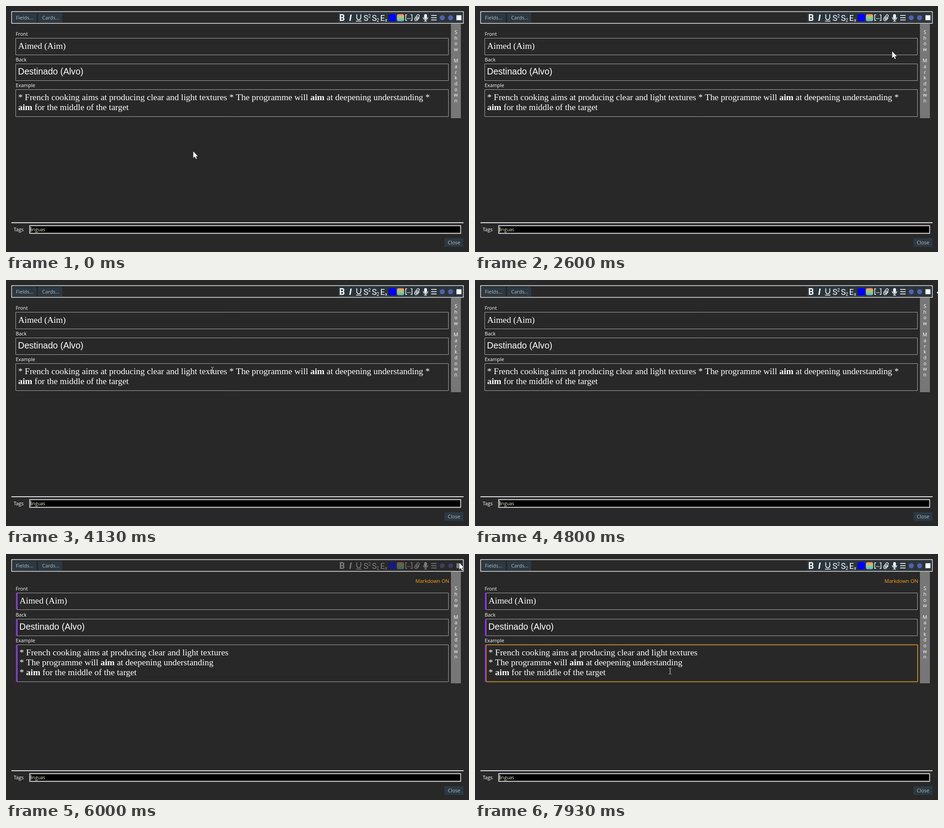
Recreate the animation shown at these times as an HTML page with a canvas. Size 1025x546 px, loop 8 s.

```html
<!DOCTYPE html>
<html lang="en">
<head>
<meta charset="utf-8">
<title>Card editor</title>
<style>
  html, body { margin: 0; width: 100%; height: 100%; overflow: hidden; background: #282828; }
  canvas { display: block; width: 1025px; height: 546px; }
</style>
</head>
<body>
<canvas id="stage" width="1025" height="546"></canvas>
<script>
const ctx = document.getElementById('stage').getContext('2d');
const LOOP = 8000, TICK = 1000 / 15;
const UI = '"Open Sans", "Noto Sans", sans-serif';
const SERIF = '"Liberation Serif", serif';
const SANS = '"Liberation Sans", sans-serif';
const ICON = 'Roboto, sans-serif';

const LAYOUTS = {
  plain: {
    left: 21.5, boxes: [[71.5, 37], [128.5, 37], [185.5, 60]],
    side: 210, letters: 62, caret: [272, 214],
    lines: ['* French cooking aims at producing clear and light textures * The programme will **aim** at deepening understanding *',
            '**aim** for the middle of the target']
  },
  markdown: {
    left: 24.5, boxes: [[86.5, 37], [144.5, 37], [201.5, 82]],
    side: 248, letters: 80.4, caret: [290, 252],
    lines: ['* French cooking aims at producing clear and light textures',
            '* The programme will **aim** at deepening understanding',
            '* **aim** for the middle of the target']
  }
};
const RIGHT = 979.5;

const smooth = p => p * p * (3 - 2 * p);
const easeOut = p => 1 - (1 - p) ** 2;

// Pointer path: tick, x, y, easing towards this point
const PATH = [
  [0, 414, 322], [6, 414, 322], [15, 717, 55], [25, 717, 55],
  [26, 707, 67], [28, 686, 88], [32, 878, 122], [37, 878, 122],
  [43, 1050, 37], [46, 1050, 36], [48, 992, 50], [49, 938, 71],
  [59, 411, 214, easeOut], [60, 411, 214], [72, 1033, 28], [73, 1050, 28],
  [75, 1050, 28], [76, 1017, 27], [77, 1010, 27], [80, 1010, 27],
  [81, 1006, 28], [89, 1006, 28], [90, 1003, 19], [97, 1003, 19],
  [105, 432, 260], [120, 432, 260]
];

function pointer(tick) {
  const i = Math.max(1, PATH.findIndex(k => k[0] >= tick));
  const [t0, x0, y0] = PATH[i - 1], [t1, x1, y1, ease = smooth] = PATH[i];
  const p = ease((tick - t0) / (t1 - t0));
  return [Math.round(x0 + (x1 - x0) * p), Math.round(y0 + (y1 - y0) * p)];
}

const layoutAt = tick => tick >= 90 ? LAYOUTS.markdown : LAYOUTS.plain;

function shapeUnder(x, y, layout) {
  if (x > 985 && x < 1007 && y > 39 && y < 39 + layout.side) return hand;
  const inField = x > layout.left && x < RIGHT &&
    layout.boxes.some(([top, h]) => y > top && y < top + h);
  return inField ? beam : arrow;
}

function rect(x, y, w, h, color) {
  ctx.fillStyle = color;
  ctx.fillRect(x, y, w, h);
}

function frame(x, y, w, h, color, width = 1, radius = 0) {
  ctx.strokeStyle = color;
  ctx.lineWidth = width;
  ctx.beginPath();
  ctx.roundRect(x, y, w, h, radius);
  ctx.stroke();
}

function text(str, x, y, font, color = '#fff', align = 'left') {
  ctx.font = font;
  ctx.fillStyle = color;
  ctx.textAlign = align;
  ctx.fillText(str, x, y);
}

function rich(str, x, y) {
  str.split('**').forEach((part, i) => {
    text(part, x, y, `${i % 2 ? 'bold ' : ''}19.45px ${SERIF}`);
    x += ctx.measureText(part).width;
  });
}

function line(d, width = 1.5, color = '#fff') {
  ctx.strokeStyle = color;
  ctx.lineWidth = width;
  ctx.stroke(new Path2D(d));
}

function button(x, y, w, h, label, tx, ty) {
  rect(x, y, w, h, '#2d3942');
  frame(x + .5, y + .5, w - 1, h - 1, '#26323a');
  text(label, tx, ty, `11px ${UI}`, '#b1b9bf');
}

function tile(fill) {
  ctx.fillStyle = fill;
  ctx.beginPath();
  ctx.roundRect(-8, -8, 16, 16, 4);
  ctx.fill();
}

function dot() {
  ctx.fillStyle = '#5560ac';
  ctx.beginPath();
  ctx.arc(0, 0, 5.5, 0, 7);
  ctx.fill();
}

function letter(main, small, dy) {
  text(main, -8, 6.5, `18px ${ICON}`);
  text(small, 2.5, 6.5 + dy, `10px ${ICON}`);
}

function rainbow() {
  const g = ctx.createLinearGradient(0, -8, 0, 8);
  ['#ee7474', '#dcae70', '#8ed27c', '#70c8a0', '#7494d8'].forEach((c, i) => g.addColorStop(i / 4, c));
  tile(g);
}

const ICONS = [
  () => text('B', 0, 7, `bold 19.5px ${ICON}`, '#fff', 'center'),
  () => text('I', 0, 7, `italic bold 19.5px ${ICON}`, '#fff', 'center'),
  () => line('M-4.5 -7.5V0A4.5 4.5 0 0 0 4.5 0V-7.5M-6 7.5H6', 1.7),
  () => letter('S', '2', -7),
  () => letter('S', '2', 2),
  () => letter('E', 'x', 2),
  () => tile('#0000ff'),
  rainbow,
  () => {
    line('M-4 -6.5H-7V6H-4M4 -6.5H7V6H4');
    [-3.5, -.7, 2.1].forEach(x => rect(x, 1, 1.6, 1.6, '#fff'));
  },
  () => {
    ctx.rotate(.65);
    line('M3.5 -3V4A3.5 3.5 0 0 1 -3.5 4V-4.5A2.6 2.6 0 0 1 1.7 -4.5V3A1 1 0 0 1 -1 3V-3', 1.4);
  },
  () => {
    ctx.fillStyle = '#fff';
    ctx.beginPath();
    ctx.roundRect(-3, -8, 6, 11, 3);
    ctx.fill();
    line('M-5.2 -1A5.2 5.2 0 0 0 5.2 -1M0 4V8M-3 7.5H3', 1.4);
  },
  () => [-5, 0, 5].forEach(y => rect(-6, y - .8, 12, 1.6, '#fff')),
  dot,
  dot,
  () => rect(-5.5, -5.5, 11, 11, '#fff')
];

function toolbar(dim) {
  frame(12.5, 12.5, 1000, 26, '#ececec', 1.5);
  button(14, 15, 54, 22, 'Fields...', 22, 30);
  button(71, 15, 54, 22, 'Cards...', 80, 30);
  ICONS.forEach((icon, i) => {
    const x = 744 + i * 18.48;
    if (!dim) rect(x - 8.7, 15, 17.4, 22, '#2b373f');
    ctx.save();
    ctx.globalAlpha = dim ? .4 : 1;
    ctx.translate(x, 26);
    icon();
    ctx.restore();
  });
}

function fields(layout, focus, caret) {
  const md = layout === LAYOUTS.markdown, tx = layout.left + 5.5;
  ['Front', 'Back', 'Example'].forEach((name, i) => {
    const [top, h] = layout.boxes[i];
    text(name, 21.5, top - 5.5, `10.8px ${UI}`);
    if (md) rect(21.5, top - .5, 2.5, h + 1, '#7d10e8');
    if (focus && i === 2) frame(layout.left, top, RIGHT + .5 - layout.left, h, '#bb8728', 2, 1.5);
    else frame(layout.left, top, RIGHT - layout.left, h, '#a9a9a9');
  });
  const [front, back, example] = layout.boxes.map(b => b[0]);
  rich('Aimed (Aim)', tx, front + 23);
  text('Destinado (Alvo)', tx - .5, back + 23.5, `19.6px ${SANS}`);
  layout.lines.forEach((str, i) => rich(str, tx, Math.round(example + 23 + i * 22.4)));
  if (caret) rect(layout.caret[0], layout.caret[1], 1, 21, '#fff');

  rect(985, 39, 22, layout.side, '#777');
  [...'Show Markdown'].forEach((ch, i) =>
    text(ch, 996, layout.letters + i * 12.67, `11px ${UI}`, '#fff', 'center'));
  if (md) text('Markdown ON', 906.5, 64, `11.05px ${UI}`, '#ff9f1a');
}

function footer() {
  rect(12, 480, 1001, 2, '#e2e2e2');
  text('Tags', 17, 500, `10.8px ${UI}`);
  rect(52, 487, 955, 18, '#000');
  frame(52.5, 487.5, 954, 17, '#dedede', 1.8);
  rect(53.5, 490, 2.5, 12, '#75796c');
  text('linguas', 53.5, 500, `10px ${UI}`, '#f3f3d8');
  button(970, 515, 43, 20, 'Close', 978, 529);
}

function outlined(d, width = 1) {
  const path = new Path2D(d);
  ctx.lineJoin = 'round';
  ctx.strokeStyle = '#000';
  ctx.lineWidth = width * 2;
  ctx.stroke(path);
  ctx.fillStyle = '#fff';
  ctx.fill(path);
}

const arrow = () => outlined('M.5 .5V15.5L4 12.2L6.6 17.8L8.8 16.8L6.3 11.4H11Z', .6);
const beam = () => line('M-3 -6.5H-.8M.8 -6.5H3M0 -6V6M-3 6.5H-.8M.8 6.5H3', 1.2, '#d4d4d4');
const resize = () => outlined('M-11 0L-6 -5V-1H6V-5L11 0L6 5V1H-6V5Z', .6);
const hand = () => outlined('M-1.5 1Q0 -1 1.5 1V8Q3 6.5 4.5 8Q6 7 7.3 8.5Q9 8 10 10V15Q9.5 17 8 19V21H0V19L-3.5 13Q-4 10.5 -1.5 11.5Z', .6);

function cursor(tick) {
  const [x, y] = pointer(tick);
  const before = Math.max(0, tick - 1);
  // The shape follows the place one tick late
  const shape = x > 1020 ? resize : shapeUnder(...pointer(before), layoutAt(before));
  ctx.save();
  ctx.translate(x, y);
  shape();
  ctx.restore();
}

function draw(ms) {
  const tick = Math.floor((ms + 5) / TICK);
  const toggling = tick >= 88 && tick < 90;
  rect(0, 0, 1025, 546, '#282828');
  toolbar(tick >= 90 && tick < 111);
  fields(layoutAt(tick), toggling || tick >= 111, toggling || (tick >= 111 && tick < 119));
  footer();
  cursor(Math.min(tick, 120));
}

const start = performance.now();
function loop() {
  draw((performance.now() - start) % LOOP);
  requestAnimationFrame(loop);
}
loop();
</script>
</body>
</html>
```
